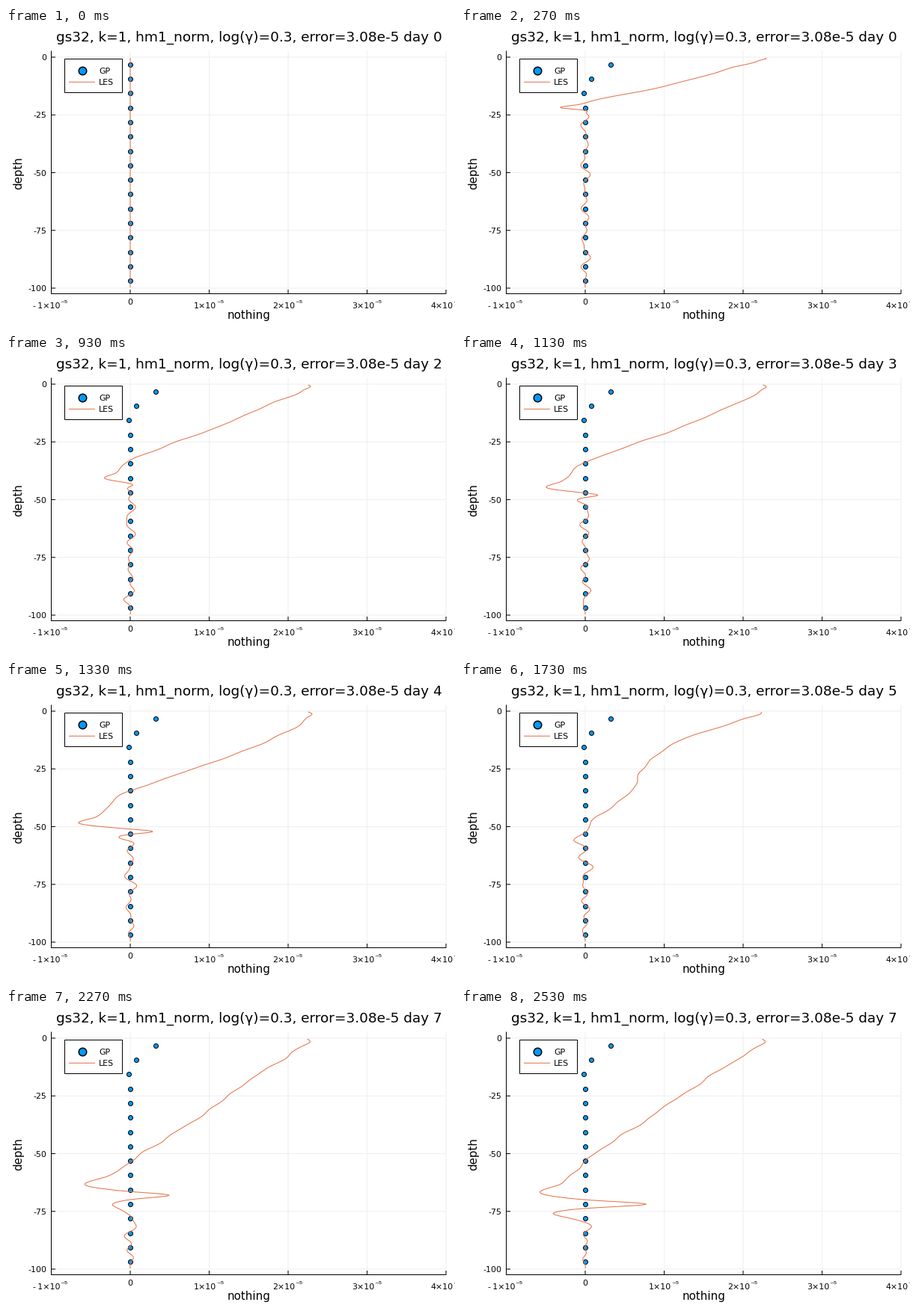
A matplotlib script that plays this animation: 600x400 px, repeating every 2.59 s.

```python
import matplotlib.pyplot as plt
import numpy as np
from matplotlib.animation import FuncAnimation
from matplotlib.patches import Rectangle

W, H = 600, 400
TICK_MS, LOOP_MS = 10, 2590
STEPS_PER_TICK = 3 / 20          # 15 steps per second
DAYS_PER_STEP = 5 / 24
BLUE, ORANGE, GRID = "#009afa", "#e26f46", "#efefef"
ZERO_X, UNIT_X = 166, 105.5      # stage x of 0 and width of 1e-5
TOP_Y, DEPTH_Y = 39, 3.09        # stage y of depth 0 and pixels per metre

plt.rcParams.update({"font.family": "DejaVu Sans", "path.snap": False})

# Mean flux in pixels against depth relative to the mixed layer
SHAPE_S = [0, .02, .06, .12, .2, .29, .41, .53, .66, .77, .85]
SHAPE_X = [235, 241, 231, 217, 190, 165, 128, 90, 45, 8, -10]

# Slow changes of the profile: bow and skew of the mixed layer,
# the negative dip at its base and the spike just below
KEY_STEPS = [8, 14, 20, 26, 31, 38]
MODES = {"bow": [28, 0, -12, -27, 12, -12],
         "skew": [-10, 0, 20, -38, -12, -3],
         "dip": [33, 34, 63, 17, 63, 57],
         "spike": [1, 5, 28, 2, 30, 75]}

LEVELS = np.linspace(1, 308, 280)   # pixels below depth 0
rng = np.random.default_rng(5)
WAVES = [(length, rng.uniform(0, 2 * np.pi), rng.uniform(-.6, .6))
         for length in (19, 27, 36, 52)]


def smooth(px, py, x):
    """Cubic Hermite curve through the points (px, py)."""
    px, py = np.array(px, float), np.array(py, float)
    slope = np.gradient(py, px)
    i = np.clip(np.searchsorted(px, x) - 1, 0, len(px) - 2)
    d = px[i + 1] - px[i]
    t = np.clip((x - px[i]) / d, 0, 1)
    return ((1 + 2 * t) * (1 - t) ** 2 * py[i] + t * (1 - t) ** 2 * d * slope[i]
            + t * t * (3 - 2 * t) * py[i + 1] - t * t * (1 - t) * d * slope[i + 1])


def bump(s, centre, width):
    return np.exp(-((s - centre) / width) ** 2)


def turbulence(step):
    """Drifting waves, stronger below the mixed layer."""
    return sum(np.sin(2 * np.pi * LEVELS / length + phase + drift * step)
               for length, phase, drift in WAVES)


def les_flux(step):
    if step == 0:
        return np.zeros_like(LEVELS)
    bow, skew, dip, spike = (np.interp(step, KEY_STEPS, m) for m in MODES.values())
    s = LEVELS / (34 * np.sqrt(step))
    inside = np.clip(s, 0, 1)
    flux = smooth(SHAPE_S + [.93, .995, 1.045, 1.1],
                  SHAPE_X + [-.55 * dip, -dip, 0, 0], s)
    flux += bow * np.sin(np.pi * inside) + skew * np.sin(2 * np.pi * inside)
    flux += spike * (bump(s, 1.06, .02) - .5 * bump(s, 1.115, .03))
    strength = np.interp(s, [0, .1, 1, 1.1], [0, .9, .9, 2 + step / 30])
    fade = np.clip((LEVELS[-1] - LEVELS) / 20, 0, 1)
    return flux + strength * fade * turbulence(step)


fig = plt.figure(figsize=(W / 100, H / 100), dpi=100, facecolor="white")
ax = fig.add_axes([0, 0, 1, 1])
ax.set(xlim=(0, W), ylim=(H, 0))
ax.axis("off")


def pt(px):
    return px * 0.72


def stroke(xs, ys, color="black", width=1, z=2):
    return ax.plot(xs, ys, color=color, lw=pt(width), zorder=z,
                   solid_capstyle="butt")[0]


def dots(xs, ys, size, edge, z):
    return ax.plot(xs, ys, "o", ms=pt(size), mfc=BLUE, mec="black",
                   mew=pt(edge), zorder=z)[0]


def label(x, y, s, size=11, ha="center", **kw):
    return ax.text(x, y, s, fontsize=pt(size), ha=ha, va="baseline", **kw)


# Grid, ticks and axis lines
LEFT, RIGHT, CEIL, FLOOR = 60.5, 588, 30.5, 355.5
for n in range(-1, 5):
    x = ZERO_X + n * UNIT_X
    stroke([x, x], [FLOOR, FLOOR - 5.5])
    if n >= 0:
        stroke([x, x], [CEIL, FLOOR], GRID, z=1)
    if n == 0:
        label(x, 369.5, "0")
    else:
        sign = "-\u2009" if n < 0 else ""
        end = x + 9.5 + (2 if n < 0 else 0)
        label(end, 375, f"{sign}{abs(n)}×10", ha="right")
        label(end, 372.5, "⁻⁵", ha="left")
for depth in range(0, 101, 25):
    y = TOP_Y + DEPTH_Y * depth
    stroke([LEFT, RIGHT], [y, y], GRID, z=1)
    stroke([LEFT, LEFT + 5.5], [y, y])
    label(54.2, y + 4, str(-depth), ha="right")
stroke([LEFT, LEFT], [CEIL, FLOOR + 0.5])
stroke([LEFT, RIGHT], [FLOOR, FLOOR])

label(324.5, 389, "nothing", 15)
label(21.5, 193.5, "depth", 15, rotation=90, rotation_mode="anchor")
title = label(324.5, 18, "", 18.5)

# Data
gp_y = TOP_Y + DEPTH_Y * (3.125 + 6.25 * np.arange(16))
gp_start = np.full(16, float(ZERO_X))
gp_later = gp_start + np.r_[33.5, 8.3, -1.6, np.zeros(13)]
gp = dots(gp_start, gp_y, 6, 1, 3)
les = stroke(gp_start, gp_y, ORANGE, 1, 4)

# Legend
ax.add_patch(Rectangle((78.5, 41.5), 77, 45, fc="white", ec="black",
                       lw=pt(1), zorder=5))
dots([101.7], [56.6], 10.5, 1.5, 6)
stroke([84, 119], [72.3, 72.3], ORANGE, 1, 6)
label(124.3, 61, "GP", ha="left", zorder=6)
label(124.3, 76, "LES", ha="left", zorder=6)


def draw(tick):
    step = int((tick + 0.5) * STEPS_PER_TICK)
    day = int(step * DAYS_PER_STEP)
    title.set_text(f"gs32, k=1, hm1_norm, log(γ)=0.3, error=3.08e-5 day {day}")
    gp.set_xdata(gp_later if step else gp_start)
    les.set_data(ZERO_X + les_flux(step), TOP_Y + LEVELS)
    return title, gp, les


anim = FuncAnimation(fig, draw, frames=LOOP_MS // TICK_MS, interval=TICK_MS,
                     repeat=True, repeat_delay=0)
plt.show()
```
